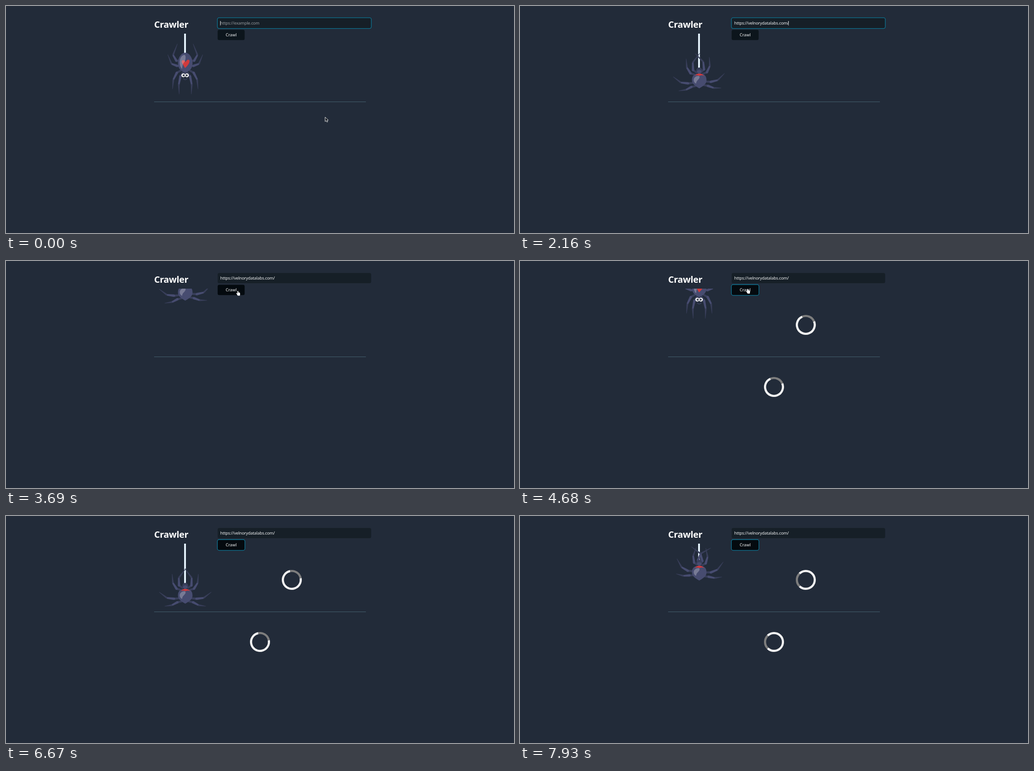
Animation, 1118 px wide and 501 px high, one loop 8000 ms. Source, as an HTML page with a canvas:

```html
<!DOCTYPE html>
<html lang="en">
<head>
<meta charset="utf-8">
<title>Crawler</title>
<style>
  html, body { margin: 0; width: 100%; height: 100%; overflow: hidden; background: #222b39; }
  svg, canvas { position: absolute; left: 0; top: 0; display: block; }
  text { font: 9.2px "Noto Sans", "Open Sans", sans-serif; fill: #f2f4f5; }
  .title { font-size: 20px; font-weight: 600; letter-spacing: -0.35px; fill: #fff; }
  .field { letter-spacing: -0.18px; }
  .hint { fill: #959b9f; }
  .ring { fill: none; stroke: #0b7594; stroke-width: 1.3; }
</style>
</head>
<body>
<svg width="1118" height="501" viewBox="0 0 1118 501">
  <text class="title" x="326" y="47.8">Crawler</text>
  <rect x="465.8" y="26.4" width="337.8" height="22.6" rx="3.5" fill="#161f27"/>
  <rect id="inputRing" class="ring" x="465.2" y="25.8" width="338.8" height="23.8" rx="4"/>
  <text id="hint" class="field hint" x="471.6" y="41.4">https://example.com</text>
  <text id="address" class="field" x="471.6" y="41.4">https://velnorydatalabs.com/</text>
  <rect id="button" x="465.8" y="52.6" width="59.4" height="22.6" rx="3.5"/>
  <rect id="buttonRing" class="ring" x="465.2" y="52" width="60.6" height="23.8" rx="4"/>
  <text x="495.5" y="67.4" text-anchor="middle">Crawl</text>
  <rect x="326" y="211" width="466" height="1" fill="#456070"/>
</svg>
<canvas id="stage" width="1118" height="501"></canvas>
<script>
const LOOP = 8000, CYCLE = 5000, RAD = Math.PI / 180;
const PASTE = 1960, MOVE = 2500, BLUR = 3000, CLICK = 4580, HIDE = 6400;
const BOTTOM = 1670, SIDE_ON = 0.65;
const LIGHT = '#474c70', DARK = '#383e59', RED = '#d03a3c';

const g = document.getElementById('stage').getContext('2d');
const el = id => document.getElementById(id);
const show = (id, on) => el(id).setAttribute('visibility', on ? 'visible' : 'hidden');
const mix = (a, b, k) => a + (b - a) * k;
const ramp = (t, from, to) => Math.max(0, Math.min(1, (t - from) / (to - from)));
const ease = (t, from, to) => {
  const k = ramp(t, from, to);
  return k * k * (3 - 2 * k);
};

// Leg stance, rear to front, hanging then climbing; degrees run from straight out to down.
const LEGS = [
  { angle: [-68, 27], reach: [46, 51], bend: [53, 13] },
  { angle: [-26, -8], reach: [43, 58], bend: [45, 23] },
  { angle: [64, -59], reach: [64, 56], bend: [-15, 20] },
  { angle: [79, -91], reach: [70, 60], bend: [-9, 32] }
];

// Drop in, hang, sink to the bottom, then climb faster and faster.
function height(u) {
  if (u < 0) return 126 - 125 * (-u / 480) ** 1.5;
  if (u < 350) return 126 - 4 * u / 350;
  if (u < BOTTOM) return 122 + 54 * ramp(u, 350, BOTTOM) ** 1.3;
  return 176 - 51 * ((u - BOTTOM) / 1260) ** 1.55;
}

// Turn: 0 head down, SIDE_ON halfway, 1 head up
const along = (p, a, b, c) =>
  p < SIDE_ON ? mix(a, b, p / SIDE_ON) : mix(b, c, (p - SIDE_ON) / (1 - SIDE_ON));

function fill(color, path) {
  g.fillStyle = color;
  g.beginPath();
  path();
  g.fill();
}

const oval = (color, x, y, rx, ry) => fill(color, () => g.ellipse(x, y, rx, ry, 0, 0, 7));

function polygon(color, pts) {
  fill(color, () => {
    for (let i = 0; i < pts.length; i += 2) g.lineTo(pts[i], pts[i + 1]);
    g.closePath();
  });
}

const polar = (deg, r, ry = r) => [-r * Math.cos(deg * RAD), ry * Math.sin(deg * RAD)];

function bone(color, [x1, y1], w1, [x2, y2], w2) {
  const d = Math.hypot(x2 - x1, y2 - y1) || 1;
  const nx = (y1 - y2) / d / 2, ny = (x2 - x1) / d / 2;
  polygon(color, [x1 + nx * w1, y1 + ny * w1, x2 + nx * w2, y2 + ny * w2,
    x2 - nx * w2, y2 - ny * w2, x1 - nx * w1, y1 - ny * w1]);
}

function legs(p, swing) {
  for (const { angle, reach, bend } of LEGS) {
    const a = mix(...angle, p) + swing, r = mix(...reach, p), b = mix(...bend, p);
    const tip = polar(a, r), ankle = polar(a + b * 0.65, r * 0.7);
    const knee = polar(a + b, r * 0.44), hip = polar(a + b, 9, 19);
    bone(DARK, tip, 0.8, ankle, 4);
    bone(LIGHT, ankle, 3.6, knee, 5.4);
    bone(DARK, knee, 4.8, hip, 4);
    oval(LIGHT, ...knee, 2.5, 2.5);
  }
}

function bodyPath(p) {
  const top = along(p, -23, -17, -15), low = along(p, 21, 18, 17.5);
  const up = along(p, 9, 11, 14), down = along(p, 11, 11, 5);
  g.beginPath();
  g.moveTo(0, top);
  g.bezierCurveTo(up, top, 16, top * 0.5, 16, 0);
  g.bezierCurveTo(16, low * 0.55, down, low * 0.8, 0, low);
  g.bezierCurveTo(-down, low * 0.8, -16, low * 0.55, -16, 0);
  g.bezierCurveTo(-16, top * 0.5, -up, top, 0, top);
}

function heart(p) {
  g.save();
  g.translate(0.5, along(p, 1, 11, 40));
  g.scale(1, along(p, 1, 0.3, 0.3));
  fill(RED, () => {
    g.moveTo(-1, 10);
    g.lineTo(-8, -2);
    g.bezierCurveTo(-10, -8, -3, -10, 0.5, -3);
    g.bezierCurveTo(3, -10, 9, -10, 9, -5);
    g.quadraticCurveTo(8, 2, -1, 10);
  });
  g.restore();
}

function crest(p) {
  const y = mix(-26, -12, ramp(p, 0.78, 1));
  fill(RED, () => {
    g.moveTo(-10, y + 2);
    g.quadraticCurveTo(0, y - 9, 11, y + 2);
    g.quadraticCurveTo(5, y - 1, 0.5, y + 2);
    g.quadraticCurveTo(-5, y - 1, -10, y + 2);
  });
}

function shine(p) {
  const top = along(p, -18, -12, -10), low = along(p, 13, 10, 7);
  fill('rgba(255,255,255,0.26)', () => {
    g.moveTo(-1, top);
    g.bezierCurveTo(-14, top, -15, low * 0.5, -7, low);
    g.bezierCurveTo(-6, low * 0.2, -4, 0, -3, -1);
    g.bezierCurveTo(1, -5, 2, top + 2, -1, top);
  });
}

function head(p, eyes) {
  const y = along(p, 24, 0, -22);
  oval(DARK, 0, y, 6.5, 6.5);
  if (p < 0.3) {
    g.strokeStyle = DARK;
    g.lineWidth = 2;
    g.beginPath();
    g.arc(0, y + 8, 4.5, 0.2, 2.9);
    g.stroke();
  }
  if (p > 0.8) oval(LIGHT, 0, y + 3, 5, 4);
  if (!eyes) return;
  for (const x of [-4.2, 3.6]) {
    oval('#fff', x, y + 3, 4.3, 4.2);
    oval('#252b3c', x * 0.85, y + 3, 2.3, 2.2);
    oval('#fff', x * 0.85 - 0.4, y + 2.6, 0.7, 0.7);
  }
}

function spider(t) {
  const u = t >= 4330 ? t - CYCLE : t;
  const y = height(u), p = ramp(u, 266, BOTTOM);
  const stride = (u - 2160) / 1530 * 2 * Math.PI;
  const swing = lag => -12 * ramp(u, BOTTOM, 2160) * (1 - Math.cos(stride + lag));
  const end = y + along(p, -22, -16, -27);

  g.save();
  g.beginPath();
  g.rect(320, 61, 144, 145);
  g.clip();
  g.fillStyle = '#e4f2fb';
  if (end > 61) g.fillRect(392, 61, 4, end - 61);
  g.translate(394.5, y);
  legs(p, swing(0));
  g.scale(-1, 1);
  legs(p, swing(1.2));
  g.scale(-1, 1);
  head(p, u < 250);
  bodyPath(p);
  g.fillStyle = LIGHT;
  g.fill();
  g.clip();
  if (p < 0.85) heart(p);
  if (p > 0.78) crest(p);
  shine(p);
  g.restore();
}

function spinner(x, y, t) {
  const a = (57 + 0.187 * (t - 5350)) * RAD, q = Math.PI / 4;
  g.lineWidth = 4.7;
  for (const [color, from, to] of [['#f3f3f3', a + q, a + 7 * q], ['#7d7d7d', a - q, a + q]]) {
    g.strokeStyle = color;
    g.beginPath();
    g.arc(x, y, 19.7, from, to);
    g.stroke();
  }
}

function arrow(x, y) {
  g.save();
  g.translate(x, y);
  polygon('#1a1d22', [0, 0, 0, 10, 2.4, 8, 4, 11.2, 5.8, 10.4, 4.3, 7.3, 7, 7]);
  g.strokeStyle = '#e8eaec';
  g.lineWidth = 1;
  g.stroke();
  g.restore();
}

function hand(x, y) {
  g.save();
  g.translate(x, y);
  fill('#fff', () => {
    g.roundRect(0.8, 0, 2, 7, 1);
    g.roundRect(0.8, 3.6, 5.8, 7, 1.6);
  });
  polygon('#fff', [-2, 5, -0.8, 4.6, 1.4, 6.4, 2, 10, 0.6, 9]);
  g.restore();
}

function pointer(t) {
  if (t < PASTE) return arrow(702.3, 245);
  if (t < MOVE || t >= HIDE) return;
  const rise = ramp(t, MOVE, 2810), glide = ease(t, 2900, 3690), settle = ease(t, 3690, 4080);
  const x = 842 - 333.5 * glide - 9 * settle;
  const y = 217 - 85 * rise - 66 * glide - 4.5 * settle;
  if (x > 525) return arrow(x, y);
  hand(x, y);
  el('button').setAttribute('fill', '#040a0f');
}

function caret(t) {
  const pasted = t >= PASTE;
  const phase = (pasted ? t - PASTE : t + 280) % 1200;
  if (t >= BLUR || phase >= 600) return;
  g.fillStyle = '#e6e8ea';
  g.fillRect(pasted ? 590.4 : 471.4, 33, 0.9, 10);
}

function draw(t) {
  const busy = t >= CLICK;
  show('hint', t < PASTE);
  show('address', t >= PASTE);
  show('inputRing', t < BLUR);
  show('buttonRing', busy);
  el('button').setAttribute('fill', busy ? '#040a0f' : '#0c151c');

  g.clearRect(0, 0, 1118, 501);
  caret(t);
  spider(t);
  if (busy) {
    spinner(629, 141, t);
    spinner(559, 278, t);
  }
  pointer(t);
}

function tick() {
  draw(performance.now() % LOOP);
  requestAnimationFrame(tick);
}
tick();
</script>
</body>
</html>
```
